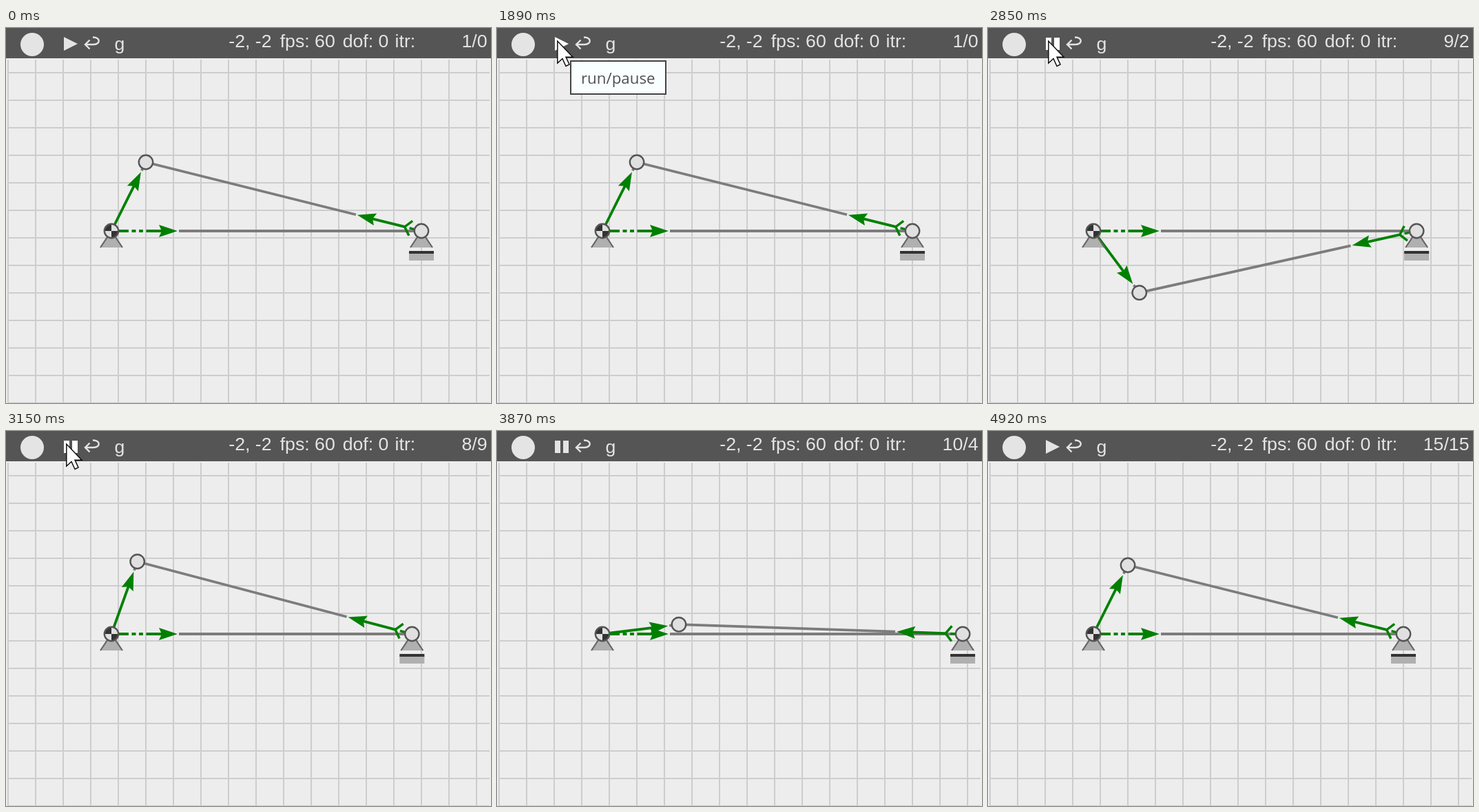
Recreate the animation shown at these times as an HTML page with a canvas. Size 704 by 545 pixels, loop 5.91 s.

```html
<!DOCTYPE html>
<html lang="en">
<head>
<meta charset="utf-8">
<title>Slider-crank mechanism</title>
<style>
  html, body { margin: 0; width: 100%; height: 100%; overflow: hidden; background: #ededed; }
  canvas { display: block; }
</style>
</head>
<body>
<canvas id="stage" width="704" height="545"></canvas>
<script>
const ctx = document.getElementById('stage').getContext('2d');

const LOOP = 5910, STEP = 30;
const RUN = { pressed: 2190, start: 2260, end: 4880, done: 4920 };
const BASE = { x: 153, y: 295 };
const CRANK = Math.hypot(50, 100), ROD = Math.hypot(400, 100);
const START_ANGLE = Math.atan2(100, 50), TURNS = 3;
const ITERATIONS = ['10/4', '9/2', '9/4', '10/2', '8/9', '8/3', '9/3'];
const GREEN = '#008000', GRAY = '#7c7c7c', DARK = '#555', LIGHT = '#e4e4e4';

const clamp01 = v => Math.min(1, Math.max(0, v));
const progress = (t, from, to) => clamp01((t - from) / (to - from));

function trace(points, closed) {
  ctx.beginPath();
  points.forEach(([x, y]) => ctx.lineTo(x, y));
  if (closed) ctx.closePath();
}
function line(points, color, width) {
  trace(points);
  ctx.strokeStyle = color;
  ctx.lineWidth = width;
  ctx.stroke();
}
function polygon(points, color) {
  trace(points, true);
  ctx.fillStyle = color;
  ctx.fill();
}
function rect(x, y, w, h, color) {
  ctx.fillStyle = color;
  ctx.fillRect(x, y, w, h);
}
function text(str, x, y, color = LIGHT, font = '26.67px "Liberation Sans", Arial, sans-serif', align = 'left') {
  ctx.font = font;
  ctx.textAlign = align;
  ctx.fillStyle = color;
  ctx.fillText(str, x, y);
}
function at(x, y, angle, draw) {
  ctx.save();
  ctx.translate(x, y);
  ctx.rotate(angle);
  draw();
  ctx.restore();
}

function drawGrid() {
  rect(0, 0, 704, 545, '#ededed');
  for (let x = 3; x < 704; x += 40) line([[x, 46], [x, 545]], '#cdcdcd', 2);
  for (let y = 65; y <= 545; y += 40) line([[2, y], [702, y]], '#cdcdcd', 2);
}

// A constraint vector: green arrow near its first joint, gray link for the rest.
function drawLink(from, to, kind) {
  const length = Math.hypot(to.x - from.x, to.y - from.y);
  at(from.x, from.y, Math.atan2(to.y - from.y, to.x - from.x), () => {
    line([[98, 0], [length, 0]], GRAY, 3.8);
    if (kind === 'fixed') ctx.setLineDash([25, 4.5, 6, 4.5, 6, 4.5]);
    line([[kind === 'free' ? 25 : 0, 0], [74, 0]], GREEN, 3.8);
    ctx.setLineDash([]);
    polygon([[96, 0], [69, -9], [73, 0], [69, 9]], GREEN);
    if (kind === 'free') {
      line([[16, -11], [25, 0], [16, 11]], GREEN, 3.5);
      line([[11, 0], [18, 0]], GREEN, 3.5);
    }
  });
}

function drawSupport({ x, y }, sliding) {
  at(x, y, 0, () => {
    polygon([[0, 0], [16, 24], [-16, 24]], '#b0b0b0');
    line([[-16, 24], [0, 0], [16, 24]], '#666', 2.2);
    if (sliding) {
      rect(-18, 31, 36, 12, '#b0b0b0');
      rect(-18, 29, 36, 4, '#333');
    }
  });
}

function drawNode({ x, y }, fixed) {
  at(x, y, 0, () => {
    ctx.beginPath();
    ctx.arc(0, 0, 10.2, 0, 2 * Math.PI);
    ctx.fillStyle = '#e0e0e0';
    ctx.fill();
    if (fixed) {
      ctx.beginPath();
      for (const a of [0, Math.PI]) {
        ctx.moveTo(0, 0);
        ctx.arc(0, 0, 10.2, a, a + Math.PI / 2);
      }
      ctx.fillStyle = '#333';
      ctx.fill();
    }
    ctx.beginPath();
    ctx.arc(0, 0, 10.2, 0, 2 * Math.PI);
    ctx.strokeStyle = DARK;
    ctx.lineWidth = 2.4;
    ctx.stroke();
  });
}

function drawMechanism(t) {
  const angle = START_ANGLE + TURNS * 2 * Math.PI * progress(t, RUN.start, RUN.end);
  const dy = CRANK * Math.sin(angle);
  const pin = { x: BASE.x + CRANK * Math.cos(angle), y: BASE.y - dy };
  const slider = { x: pin.x + Math.sqrt(ROD * ROD - dy * dy), y: BASE.y };
  drawLink(BASE, slider, 'fixed');
  drawLink(BASE, pin, 'driven');
  drawLink(slider, pin, 'free');
  drawSupport(BASE, false);
  drawSupport(slider, true);
  drawNode(BASE, true);
  drawNode(pin);
  drawNode(slider);
}

function iterations(t) {
  if (t < RUN.start) return '1/0';
  if (t >= RUN.done) return '15/15';
  return ITERATIONS[(t - RUN.pressed) / STEP % ITERATIONS.length];
}

function drawToolbar(t) {
  rect(0, 0, 704, 44, DARK);
  ctx.beginPath();
  ctx.arc(38, 24, 17, 0, 2 * Math.PI);
  ctx.fillStyle = LIGHT;
  ctx.fill();

  const buttonColor = t >= 1290 && t < 3240 ? '#fff' : LIGHT;
  if (t >= RUN.pressed && t < RUN.done) {
    rect(84, 14, 8, 18, buttonColor);
    rect(96, 14, 8, 18, buttonColor);
  } else {
    polygon([[84, 13], [104, 23], [84, 33]], buttonColor);
  }

  ctx.beginPath();
  ctx.moveTo(126, 13.5);
  ctx.bezierCurveTo(137.5, 13, 137.5, 24, 127, 24);
  ctx.lineTo(115, 24);
  ctx.moveTo(121.5, 17.5);
  ctx.lineTo(115, 24);
  ctx.lineTo(121.5, 30.5);
  ctx.strokeStyle = LIGHT;
  ctx.lineWidth = 2.4;
  ctx.stroke();

  text('g', 157.5, 32);
  text('-2, -2', 323.3, 28);
  text('fps: 60', 397.7, 28);
  text('dof: 0', 488.7, 28);
  text('itr:', 564.6, 28);
  text(iterations(t), 698.5, 28, LIGHT, undefined, 'right');
}

function drawTooltip() {
  rect(106, 47, 140, 50, '#444');
  rect(108, 49, 136, 46, '#f9ffff');
  text('run/pause', 122, 81, '#505050', '22.3px "Open Sans", "Noto Sans", sans-serif');
}

function drawCursor(t) {
  if (t < 960 || t >= 3360) return;
  const away = (1 - progress(t, 900, 1470)) ** 2;
  const leave = progress(t, 3150, 3360) ** 2;
  at(87 - 13 * away + 8 * leave, 18 - 58 * away - 58 * leave, 0, () => {
    const outline = [[0.8, 1], [0.8, 33], [8, 26.5], [13, 37.5], [18, 35], [13, 24.3], [23, 24.3]];
    polygon(outline, '#fff');
    trace(outline, true);
    ctx.strokeStyle = '#111';
    ctx.lineWidth = 1.5;
    ctx.stroke();
  });
}

const began = performance.now();
function render() {
  const elapsed = (performance.now() - began) % LOOP;
  const t = Math.floor(elapsed / STEP) * STEP;
  drawGrid();
  drawMechanism(t);
  drawToolbar(t);
  if (t >= 1890 && t < RUN.pressed) drawTooltip();
  drawCursor(t);
  requestAnimationFrame(render);
}
render();
</script>
</body>
</html>
```
